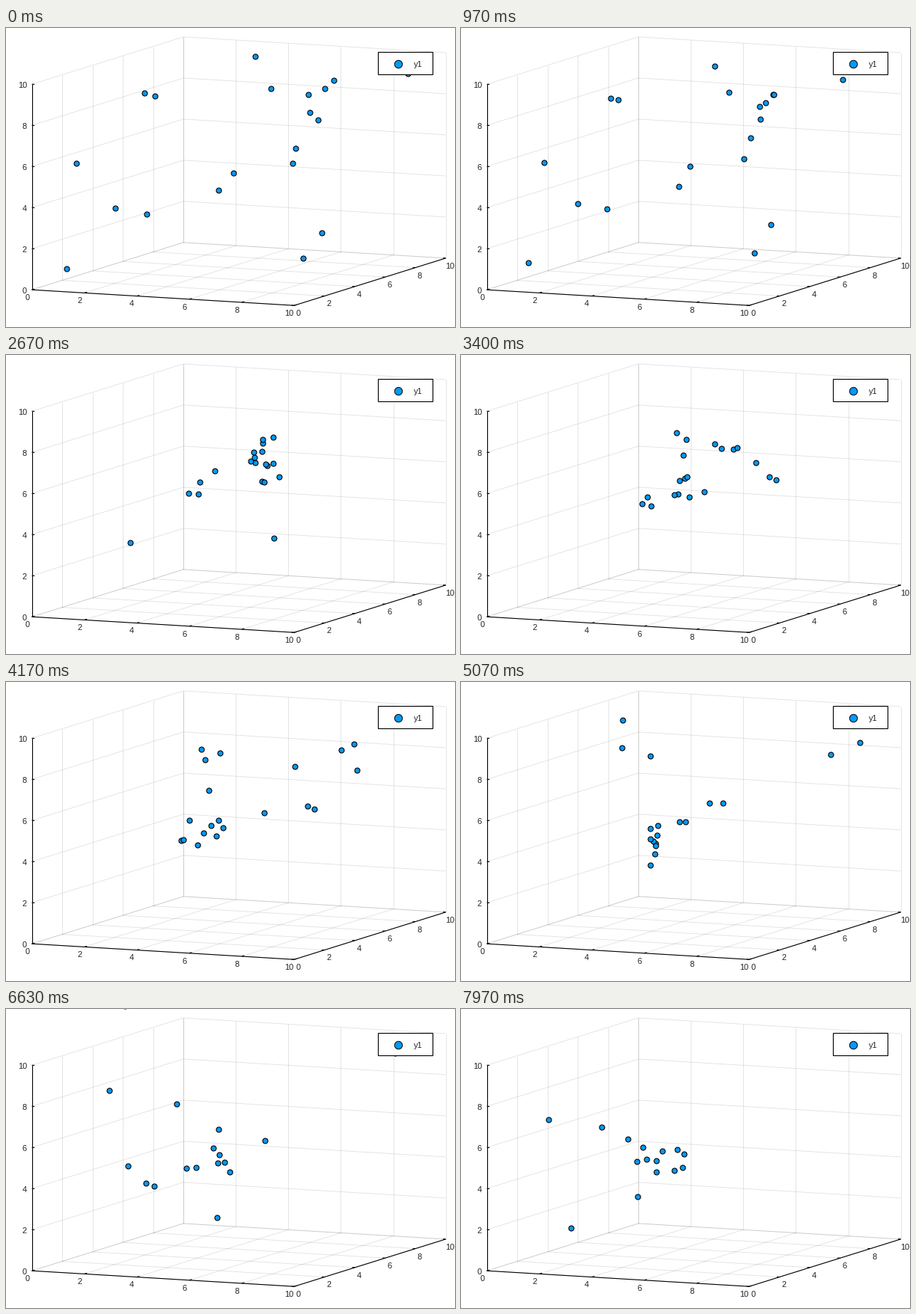
A matplotlib script that plays this animation: 600x400 px, repeating every 8 s.

```python
import numpy as np
import matplotlib.pyplot as plt
from matplotlib.animation import FuncAnimation
from matplotlib.collections import LineCollection
from matplotlib.patches import Rectangle

W, H, DPI = 600, 400, 100
FRAMES, LOOP = 240, 8000
PX = 72 / DPI                       # points per pixel
BLUE, INK = "#009afa", "#222222"

# Screen position of the box corner and screen steps per unit of x, y and z
OX, OY = 35, 350.6
XX, XY = 35.05, 2.1
YX, YY = 20.25, -6.33
ZY = -27.5

fig = plt.figure(figsize=(W / DPI, H / DPI), dpi=DPI, facecolor="white")
ax = fig.add_axes([0, 0, 1, 1])
ax.set_xlim(0.4, W + 0.4)
ax.set_ylim(H + 0.4, 0.4)
ax.axis("off")


def project(x, y, z):
    return OX + XX * x + YX * y, OY + XY * x + YY * y + ZY * z


def seg(a, b):
    return [project(*a), project(*b)]


def label(x, y, s, ha="center"):
    ax.text(x, y, s, ha=ha, va="center_baseline", family="Liberation Sans",
            size=11 * PX, color=INK, zorder=6)


# ---- box, ticks and labels ----
grid, ticks = [], []
for v in range(0, 11, 2):
    grid += [
        seg((0, v, 0), (0, v, 10)), seg((0, 0, v), (0, 10, v)),
        seg((v, 10, 0), (v, 10, 10)), seg((0, 10, v), (10, 10, v)),
        seg((v, 0, 0), (v, 10, 0)), seg((0, v, 0), (10, v, 0)),
    ]
    ticks += [
        seg((v, 0, 0), (v, 0.17, 0)),
        seg((10, v, 0), (9.9, v, 0)),
        seg((0, 0, v), (0.1, 0, v)),
    ]
    label(28.4, 351.1 + ZY * v, str(v), "right")
    label(28.6 + 35 * v, 360.4 + 2.1 * v, str(v))
    label(391 + YX * v, 381.4 - 6.3 * v, str(v))

axes = [seg((0, 0, 0), (0, 0, 10)), seg((0, 0, 0), (10, 0, 0)),
        seg((10, 0, 0), (10, 10, 0))]
ax.add_collection(LineCollection(grid, colors=[(0, 0, 0, 0.1)],
                                 linewidths=PX, zorder=1))
ax.add_collection(LineCollection(axes + ticks, colors="black",
                                 linewidths=1.1 * PX, zorder=2))

# ---- legend ----
ax.add_patch(Rectangle((497.5, 32.5), 73, 30, fc="white", ec="black",
                       lw=1.1 * PX, zorder=5))
ax.scatter([524.5], [48], s=(10.4 * PX) ** 2, c=BLUE, edgecolors="black",
           linewidths=PX, zorder=6)
label(550.7, 48.6, "y1")

# ---- equal masses, released at rest, under softened gravity ----
START = np.array([
    (94, 181), (81, 322), (146, 241), (188, 249), (185, 87),
    (199, 91), (333, 38), (354, 81), (404, 89), (406, 113),
    (417, 123), (426, 81), (438, 70), (387, 161), (383, 181),
    (304, 194), (284, 217), (422, 274), (397, 308), (537, 61),
], float)
G, SOFT, STEPS = 3.3, 1.3, 10


def place(screen, rng):
    """Lift screen points into the box at a random depth that fits it."""
    u, w = (screen - (OX, OY)).T
    rise = w - u * XY / XX
    slope = YY - YX * XY / XX
    low = np.maximum.reduce([0 * u, (u - 10 * XX) / YX,
                             (rise - 10 * ZY) / slope])
    high = np.minimum.reduce([0 * u + 10, u / YX, rise / slope])
    y = low + (high - low) * rng.random(len(u))
    return np.column_stack([(u - YX * y) / XX, y, (rise - slope * y) / ZY])


def pull(pos):
    gap = pos[None] - pos[:, None]
    dist2 = (gap ** 2).sum(-1, keepdims=True) + SOFT ** 2
    return G * (gap / dist2 ** 1.5).sum(1)


def simulate():
    pos = place(START, np.random.default_rng(4))
    vel = np.zeros_like(pos)
    dt = LOOP / 1000 / FRAMES / STEPS
    acc, path = pull(pos), []
    for _ in range(FRAMES):
        path.append(np.column_stack(project(*pos.T)))
        for _ in range(STEPS):
            vel += acc * dt / 2
            pos += vel * dt
            acc = pull(pos)
            vel += acc * dt / 2
    return path


path = simulate()
dots = ax.scatter(*path[0].T, s=(7 * PX) ** 2, c=BLUE, edgecolors="black",
                  linewidths=1.1 * PX, zorder=4)


def draw(i):
    dots.set_offsets(path[i])
    return dots,


anim = FuncAnimation(fig, draw, frames=FRAMES, interval=LOOP / FRAMES,
                     init_func=lambda: draw(0), repeat=True, repeat_delay=0)
plt.show()
```
